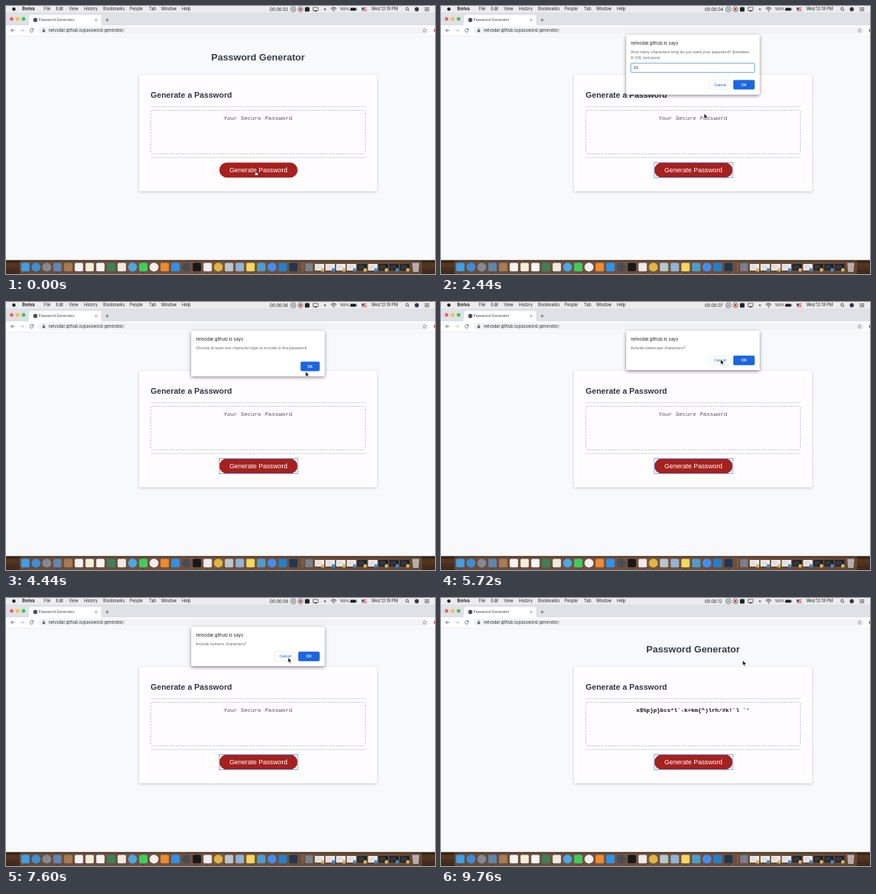
These frames come from a looping animation (600 px wide and 374 px high, 9.8 s). An HTML page:

```html
<!DOCTYPE html>
<html lang="en">
<head>
<meta charset="utf-8">
<title>Password Generator</title>
<style>
html, body { margin: 0; width: 100%; height: 100%; overflow: hidden; background: #f9fafc; }
svg { display: block; width: 100vw; height: 100vh; }
text { font-family: Inter, Roboto, sans-serif; white-space: pre; }
.arial { font-family: "Liberation Sans", Arial, sans-serif; }
.mono { font-family: "Liberation Mono", "Courier New", monospace; }
</style>
</head>
<body>
<svg id="stage" viewBox="0 0 600 374" xmlns="http://www.w3.org/2000/svg">
  <defs>
    <linearGradient id="wood" x1="0" y1="0" x2="0" y2="1">
      <stop offset="0" stop-color="#21150f"/>
      <stop offset=".3" stop-color="#5a3a25"/>
      <stop offset="1" stop-color="#3a2418"/>
    </linearGradient>
    <linearGradient id="shelf" x1="0" y1="0" x2="1" y2="0">
      <stop offset="0" stop-color="#6b5142"/>
      <stop offset=".5" stop-color="#7c5a43"/>
      <stop offset="1" stop-color="#6a4a37"/>
    </linearGradient>
    <filter id="soft" x="-10%" y="-10%" width="120%" height="130%">
      <feDropShadow dx="0" dy="1" stdDeviation="1.6" flood-color="#000" flood-opacity=".25"/>
    </filter>
    <filter id="deep" x="-10%" y="-20%" width="120%" height="150%">
      <feDropShadow dx="0" dy="1.5" stdDeviation="2.4" flood-color="#000" flood-opacity=".5"/>
    </filter>
  </defs>
  <g id="page"></g>
  <g id="bars"></g>
  <g id="dock"></g>
  <g id="dialog"></g>
  <g id="arrow">
    <path d="M0 0V7.2L1.7 5.7L2.8 8.2L4 7.7L2.9 5.2H5.1Z" fill="#111" stroke="#fff" stroke-width=".6"/>
  </g>
  <g id="hand">
    <path d="M-.6 .2Q0-.6 .6 .2V2.4L3 3Q3.6 3.3 3.4 4.2L2.8 6.6H-.6L-2.4 3.8Q-2.2 3.2-1.5 3.5L-.6 4.2Z" fill="#fff" stroke="#111" stroke-width=".6"/>
  </g>
</svg>
<script>
const LOOP = 9800;
const HOST = 'nelvodar.github.io';
const $ = id => document.getElementById(id);
const esc = s => s.replace(/&/g, '&amp;').replace(/</g, '&lt;').replace(/>/g, '&gt;');
const rect = (x, y, w, h, fill, more = '') =>
  `<rect x="${x}" y="${y}" width="${w}" height="${h}" fill="${fill}" ${more}/>`;
const disc = (x, y, r, fill, more = '') => `<circle cx="${x}" cy="${y}" r="${r}" fill="${fill}" ${more}/>`;
const text = (x, y, size, s, fill, more = '') =>
  `<text x="${x}" y="${y}" font-size="${size}" fill="${fill}" ${more}>${esc(s)}</text>`;
const line = (d, color, width = .7, more = '') =>
  `<path d="${d}" fill="none" stroke="${color}" stroke-width="${width}" ${more}/>`;
const MID = 'text-anchor="middle"';
const BOLD = 'font-weight="700"';

function drawPage() {
  $('page').innerHTML =
    rect(0, 42, 600, 313, '#f8f9fb') +
    text(352.5, 76, 13.4, 'Password Generator', '#363c48', `class="arial" ${BOLD} ${MID}`) +
    rect(186, 96, 333, 162.5, '#fffdff', 'rx="1.5" filter="url(#soft)"') +
    text(202.3, 128.3, 11.2, 'Generate a Password', '#2f3642', `class="arial" ${BOLD}`) +
    line('M202.5 140.5H503M202.5 211.5H503', '#ced2d9', .8) +
    rect(202.6, 145.5, 300, 61, 'none', 'rx="2" stroke="#b4bcc5" stroke-width=".9" stroke-dasharray="2.6 1.7"') +
    text(352.3, 159.3, 8.02, '', '#333', `id="result" class="mono" ${MID}`) +
    rect(298.3, 218.6, 109.6, 20.8, '#a6211e', 'rx="10.4"') +
    text(353, 232.1, 9.2, 'Generate Password', '#fff', `class="arial" ${MID}`) +
    rect(298.2, 218.5, 109.8, 21, 'none', 'id="ring" stroke="#5f9fe8" stroke-width=".9"');
}

function drawMenuBar() {
  const items = [[53, 'File'], [70, 'Edit'], [88, 'View'], [109, 'History'], [136, 'Bookmarks'],
    [173, 'People'], [200, 'Tab'], [217, 'Window'], [246, 'Help']];
  const ink = '#1d1d1f';
  let stripes = '';
  for (let i = 0; i < 4; i++) stripes += rect(497.5, 2.3 + i * 1.4, 7, .7, '#c8323c');
  return rect(0, 0, 600, 9, '#ececee') +
    disc(11, 4.3, 2.4, '#222') +
    text(22.7, 6.4, 5.65, 'Brelva', ink, BOLD) +
    items.map(([x, s]) => text(x, 6.4, 5.65, s, ink)).join('') +
    text(369, 6.5, 5.9, '', ink, 'id="clock" font-feature-settings="\'tnum\'"') +
    disc(401.8, 4.6, 3.5, '#f6f6f6', 'stroke="#333" stroke-width=".7"') +
    line('M400.8 3V6.2M402.8 3V6.2', '#333', .8) +
    disc(411.8, 4.6, 3.5, '#f6f6f6', 'stroke="#333" stroke-width=".7"') +
    rect(410.2, 3, 3.2, 3.2, '#d2302c') +
    rect(418, 1.5, 6.5, 6.2, '#222', 'rx="1.2"') +
    rect(429.5, 2, 7, 4.3, 'none', `stroke="${ink}" stroke-width=".6"`) +
    '<path d="M431.2 7.6L433 5.2L434.8 7.6Z" fill="#1d1d1f"/>' +
    disc(446, 4.5, 1.5, '#777') +
    line('M454.2 3.7Q458.2 .3 462.2 3.7M455.7 5.1Q458.2 3.1 460.7 5.1', ink, .9) +
    disc(458.2, 6.7, .8, ink) +
    text(467, 6.4, 5.3, '100%', ink) +
    rect(481.6, 2.6, 8, 4, ink, 'rx=".8"') + rect(490, 3.8, .8, 1.6, ink) +
    rect(497.5, 2.3, 7, 4.9, '#fff') + stripes + rect(497.5, 2.3, 3, 2.6, '#34477f') +
    text(511, 6.4, 5.65, 'Wed 12:19 PM', ink) +
    disc(561, 4, 1.9, 'none', `stroke="${ink}" stroke-width=".7"`) + line('M562.4 5.4L564 7', ink, .8) +
    disc(574.5, 4.5, 2.9, '#3a3550') +
    line('M585.5 2.6H592M585.5 4.6H592M585.5 6.6H592', ink, .7);
}

function drawBars() {
  const lights = ['#fc5b57', '#fdbc40', '#34c84a'];
  const gray = '#5f6368';
  $('bars').innerHTML = drawMenuBar() +
    rect(0, 9, 600, 18.2, '#dee1e6') +
    lights.map((c, i) => disc(7.8 + i * 8.4, 18, 2.5, c)).join('') +
    '<path d="M29 27.2Q32 27.2 32 24V15.4Q32 12.6 35 12.6H130Q133 12.6 133 15.4V24Q133 27.2 136 27.2Z" fill="#fff"/>' +
    disc(41, 19.5, 2.9, '#4a4e53') +
    text(45.6, 21.4, 5.2, 'Password Generator', '#3c4043') +
    line('M124.4 18L127.6 21.2M127.6 18L124.4 21.2', gray) +
    line('M139 19.5H144.2M141.6 16.9V22.1', gray, .8) +
    rect(0, 27, 600, 15, '#fff') +
    line('M0 41.9H600', '#dcdee2', .5) +
    line('M12 34H6.8M9.2 31.6L6.8 34L9.2 36.4', '#4e5257', .8) +
    line('M19.8 34H25M22.6 31.6L25 34L22.6 36.4', '#b6b9bd', .8) +
    line('M37.9 32.6A2.4 2.4 0 1 0 38.3 34.6', '#4e5257', .8) +
    '<path d="M38.6 31V33.5H36.1Z" fill="#4e5257"/>' +
    rect(45, 28.6, 547, 10.9, '#f1f3f4', 'rx="5.4"') +
    rect(51, 33.3, 3.6, 3, gray, 'rx=".4"') +
    line('M51.8 33.4V32.3A1 1 0 0 1 53.8 32.3V33.4', gray, .6) +
    text(59.5, 36, 5.63, HOST + '/password-generator/', '#2a2d31') +
    '<path d="M585.5 31.4L586.3 33.2L588.2 33.4L586.8 34.7L587.2 36.6L585.5 35.6L583.8 36.6L584.2 34.7L582.8 33.4L584.7 33.2Z" fill="none" stroke="#5f6368" stroke-width=".5"/>' +
    disc(600.8, 34, 2.4, '#c83a32');
}

function drawDock() {
  // Colour, then "o" for a round icon
  const icons = ('#3f9fe8 #3a8fd8o #858a92o #5f86b0 #a87b52 #f4f2f2 #f2eddc #f3f3f3 #3f7f58 #efe9e2 ' +
    '#47a9e8o #3fcf5c #f5f0f4o #f08a2c #2c93ef #4b4d52o #17181a #efebee #dfb73fo #b9c6d0 #8fb4d8 #f2d95c ' +
    '#4a9fd0 #3f8ef4o #2280cc #23364f').split(' ');
  const running = [0, 3, 11, 16, 17, 18, 21, 23, 24, 25];
  let s = rect(0, 354.6, 600, 19.4, 'url(#wood)');
  for (let i = 0; i < 12; i++)
    s += line(`M0 ${356 + i * 1.6}q150 ${i % 3 - 1} 300 0t300 0`, i % 2 ? '#2a190f' : '#75492c', .5, 'opacity=".4"');
  s += rect(19, 355.8, 563, 18.2, 'url(#shelf)', 'rx="2" opacity=".85"');
  icons.forEach((c, i) => {
    const x = 27 + i * 15, fill = c.slice(0, 7);
    s += c.endsWith('o') ? disc(x, 364.4, 6.2, fill) : rect(x - 5.8, 358.6, 11.6, 11.6, fill, 'rx="1.6"');
    if (running.includes(i)) s += disc(x, 372.4, .6, '#1b120d');
  });
  s += line('M415 358V371', '#b49a88', .5) + rect(418.5, 359, 10.5, 11, '#778190', 'rx="1"');
  for (let i = 0; i < 9; i++) {
    const x = 432 + i * 14.9, dark = i === 4 || i > 5;
    s += rect(x, 360, 13, 9, dark ? '#1c2027' : '#f1f0f0');
    s += line(`M${x + 1.5} 362.2h7M${x + 1.5} 364.4h9M${x + 1.5} 366.6h5`, dark ? '#65748b' : '#a9adb5', .6);
    s += rect(x + 8.5, 366, 4.5, 4.5, i % 2 ? '#3b8bd4' : '#d9b45a', 'rx=".8"');
  }
  s += '<path d="M568.2 358.5H578L576.8 371H569.4Z" fill="#c9c7c6" opacity=".9"/>' +
    line('M568.2 359H578M570.6 361L571.2 370M573.1 361V370M575.6 361L575 370', '#8f8c8a', .6);
  $('dock').innerHTML = s;
}

const PROMPT = ['How many characters long do you want your password? (between', '8-128, inclusive)'];
// Each scene holds until its end time
const scenes = [
  { end: 960 },
  { end: 3920, lines: PROMPT, input: true, height: 83 },
  { end: 4900, lines: ['Choose at least one character type to include in the password'], alert: true, height: 63 },
  { end: 5600, lines: ['Include uppercase characters?'], height: 54.7 },
  { end: 6520, lines: ['Include lowercase characters?'], height: 54.7 },
  { end: 7760, lines: ['Include numeric characters?'], height: 54.7 },
  { end: 8720, lines: ['Include special characters?'], height: 54.7 },
  { end: LOOP, done: true }
];

function button(x, y, w, label, primary) {
  return rect(x, y, w, 12.8, primary ? '#1b67e0' : '#fff', `rx="1.6" stroke="${primary ? '#1b67e0' : '#dadce0'}" stroke-width=".5"`) +
    text(x + w / 2, y + 8.2, 5, label, primary ? '#fff' : '#1a66dc', `${MID} font-weight="${primary ? 600 : 500}"`);
}

function dialogMarkup(d, typed) {
  if (!d.lines) return '';
  const y = 40.4 + d.height - 20;
  let s = rect(259, 40.4, 186.5, d.height, '#fff', 'rx="1.6" filter="url(#deep)"') +
    text(265.4, 53.7, 6.08, HOST + ' says', '#202124') +
    d.lines.map((l, i) => text(265.4, 66 + i * 8, 5.3, l, '#5a5e63')).join('');
  if (d.input)
    s += rect(265.6, 79.9, 173, 12.8, '#fff', 'rx="1" stroke="#5b9bd8" stroke-width=".9"') +
      text(269, 88.2, 5.3, typed, '#202124');
  return s + (d.alert ? button(412.2, y, 26.3, 'OK', true)
    : button(375.7, y, 29.8, 'Cancel') + button(409, y, 29.5, 'OK', true));
}

// time, x, y of the pointer tip
const path = [
  [0, 349.4, 230], [960, 349.4, 230], [1280, 351.7, 210], [1800, 368, 150], [2760, 368, 150],
  [3440, 425.5, 110], [4040, 425.5, 110], [4440, 419, 97], [4720, 424, 89], [4960, 424, 88],
  [5400, 391, 80], [5720, 391, 80], [6280, 423, 80], [6640, 423, 80], [7280, 394.5, 83],
  [7840, 394.5, 83], [8400, 422, 84], [8800, 422, 84], [9300, 422, 87], [LOOP, 422, 87]
];

function pointer(t) {
  const i = path.findIndex(p => p[0] > t);
  const [t0, x0, y0] = path[i - 1], [t1, x1, y1] = path[i];
  const u = (t - t0) / (t1 - t0), k = u * u * (3 - 2 * u);
  return [x0 + (x1 - x0) * k, y0 + (y1 - y0) * k];
}

let shown = '';
function render(t) {
  const scene = scenes.find(s => t < s.end);
  const typed = '33'.slice(0, t < 2200 ? 0 : t < 2400 ? 1 : 2);
  const key = scene.end + typed;
  if (key !== shown) {
    shown = key;
    $('dialog').innerHTML = dialogMarkup(scene, typed);
    $('result').textContent = scene.done ? "x$%p}p}bcs*l`-k>km{^)lrh/#k!`l `'" : 'Your Secure Password';
    $('result').setAttribute('fill', scene.done ? '#111' : '#555');
    $('result').setAttribute('font-weight', scene.done ? 700 : 400);
  }
  $('clock').textContent = '00:00:' + String(Math.floor(2.26 + t / 1000)).padStart(2, '0');
  $('ring').style.display = t < 900 ? 'none' : '';
  const [x, y] = pointer(t), hand = t < 960;
  for (const id of ['arrow', 'hand']) $(id).setAttribute('transform', `translate(${x} ${y})`);
  $('hand').style.display = hand ? '' : 'none';
  $('arrow').style.display = hand ? 'none' : '';
}

drawPage();
drawBars();
drawDock();
render(0);
const start = performance.now();
function tick() {
  render((performance.now() - start) % LOOP);
  requestAnimationFrame(tick);
}
requestAnimationFrame(tick);
</script>
</body>
</html>
```
